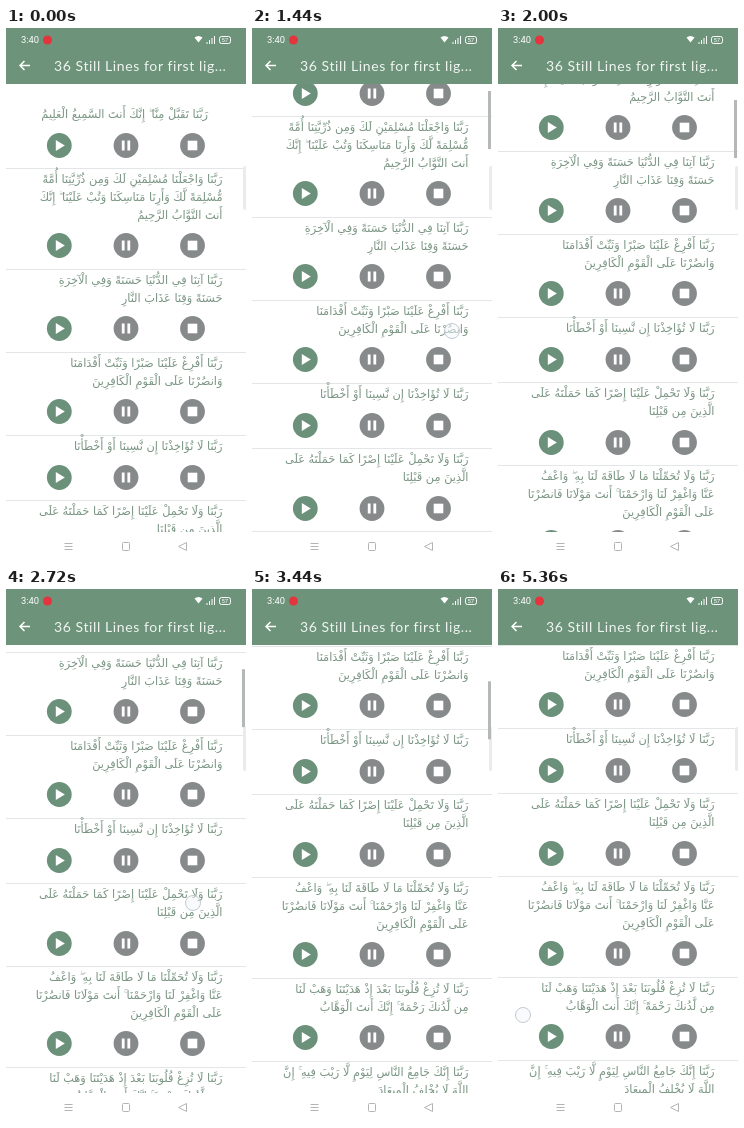
These frames come from a looping animation (240 px wide and 533 px high, 5440 ms). An HTML page:

```html
<!DOCTYPE html>
<html lang="en">
<head>
<meta charset="utf-8">
<style>
  html, body { margin: 0; width: 100%; height: 100%; overflow: hidden; background: #fff; }
  #stage { position: relative; width: 240px; height: 533px; overflow: hidden; background: #fff; }
  #stage > * { position: absolute; }
  #list { left: 0; top: 55px; width: 240px; height: 449px; overflow: hidden; }
  #rows { padding-top: 21px; }
  .row { box-sizing: border-box; border-bottom: 1px solid #e3e5e6; padding: 2px 23.5px 0 0; direction: rtl; }
  .line { height: 17.7px; font: 11.35px/17.7px "DejaVu Sans", sans-serif; color: #7a9583; white-space: nowrap; }
  .row svg { display: block; position: relative; left: 23.5px; margin-top: 8px; }
  #bar { left: 0; top: 0; width: 240px; height: 56px; background: #6d947a; color: #fff; }
  #bar svg { position: absolute; left: 0; top: 0; }
  #bar span { position: absolute; white-space: pre; }
  #clock { left: 15px; top: 6px; font: 9.4px/12px Roboto, sans-serif; }
  #title { left: 48px; top: 28px; font: 14px/20px Lato, sans-serif; letter-spacing: .6px; color: #f0f5f1; }
  #nav { left: 0; top: 504px; background: #fff; }
  #edge { left: 237px; top: 138px; width: 3px; height: 44px; background: #ebebeb; border-radius: 2px 0 0 2px; }
  #thumb { left: 236px; top: 56px; width: 3px; height: 58px; background: #b4b8b6; }
  #touch { left: -8px; top: -8px; width: 14px; height: 14px; border: 1px solid #c3cad4; border-radius: 50%; background: #f4f6f980; }
</style>
</head>
<body>
<div id="stage">
  <div id="list"><div id="rows"></div></div>
  <div id="edge"></div>
  <div id="thumb"></div>
  <div id="bar">
    <span id="clock">3:40</span>
    <svg width="240" height="56" fill="none" stroke="#fff">
      <circle cx="41.500" cy="12" r="4.500" fill="#e4343e" stroke="none"/>
      <path d="M188.500 9.500q4-3 8 0l-4 5z" fill="#fff" stroke="none"/>
      <path d="M201 16v-2M203.500 16v-4M206 16v-6M208.500 16v-8"/>
      <rect x="213.500" y="8.500" width="11" height="7" rx="2"/>
      <text x="215.500" y="14.200" font-family="Roboto, sans-serif" font-size="6" fill="#fff" stroke="none">57</text>
      <path d="M24 37.500H14.500M18.500 33l-4.500 4.500 4.500 4.500" stroke-width="1.500"/>
    </svg>
    <span id="title">36 Still Lines for first lig...</span>
  </div>
  <svg id="nav" width="240" height="29" fill="none" stroke="#b4b4b4">
    <path d="M58.500 11.500h8M58.500 14.500h8M58.500 17.500h8M180.500 10.500v8l-8-4z"/>
    <rect x="116.500" y="10.500" width="7" height="8" rx="1"/>
  </svg>
  <div id="touch"></div>
</div>
<script>
const LOOP = 5440, STEP = 80;
const $ = id => document.getElementById(id);

const verses = [
  ["&nbsp;&nbsp;&nbsp;&nbsp;رَبَّنَا تَقَبَّلْ مِنَّا ۖ إِنَّكَ أَنتَ السَّمِيعُ الْعَلِيمُ"],
  ["رَبَّنَا وَاجْعَلْنَا مُسْلِمَيْنِ لَكَ وَمِن ذُرِّيَّتِنَا أُمَّةً",
   "مُّسْلِمَةً لَّكَ وَأَرِنَا مَنَاسِكَنَا وَتُبْ عَلَيْنَا ۖ إِنَّكَ",
   "أَنتَ التَّوَّابُ الرَّحِيمُ"],
  ["رَبَّنَا آتِنَا فِي الدُّنْيَا حَسَنَةً وَفِي الْآخِرَةِ",
   "حَسَنَةً وَقِنَا عَذَابَ النَّارِ"],
  ["رَبَّنَا أَفْرِغْ عَلَيْنَا صَبْرًا وَثَبِّتْ أَقْدَامَنَا",
   "وَانصُرْنَا عَلَى الْقَوْمِ الْكَافِرِينَ"],
  ["رَبَّنَا لَا تُؤَاخِذْنَا إِن نَّسِينَا أَوْ أَخْطَأْنَا"],
  ["رَبَّنَا وَلَا تَحْمِلْ عَلَيْنَا إِصْرًا كَمَا حَمَلْتَهُ عَلَى",
   "الَّذِينَ مِن قَبْلِنَا"],
  ["رَبَّنَا وَلَا تُحَمِّلْنَا مَا لَا طَاقَةَ لَنَا بِهِ ۖ وَاعْفُ",
   "عَنَّا وَاغْفِرْ لَنَا وَارْحَمْنَا ۚ أَنتَ مَوْلَانَا فَانصُرْنَا",
   "عَلَى الْقَوْمِ الْكَافِرِينَ"],
  ["رَبَّنَا لَا تُزِغْ قُلُوبَنَا بَعْدَ إِذْ هَدَيْتَنَا وَهَبْ لَنَا",
   "مِن لَّدُنكَ رَحْمَةً ۚ إِنَّكَ أَنتَ الْوَهَّابُ"],
  ["رَبَّنَا إِنَّكَ جَامِعُ النَّاسِ لِيَوْمٍ لَّا رَيْبَ فِيهِ ۚ إِنَّ",
   "اللَّهَ لَا يُخْلِفُ الْمِيعَادَ"]
];

const buttons = `<svg width="240" height="27" fill="#fff">
  <circle cx="53.300" cy="13.500" r="12.400" fill="#6b917a"/><path d="M49.800 8v11l9-5.500z"/>
  <circle cx="120" cy="13.500" r="12.400" fill="#878a8b"/><path d="M115.800 8.500h2.800v10h-2.800zM121.400 8.500h2.800v10h-2.800z"/>
  <circle cx="186.500" cy="13.500" r="12.400" fill="#878a8b"/><path d="M181.700 8.700h9.600v9.600h-9.600z"/>
</svg>`;

$("rows").innerHTML = verses.map(lines =>
  `<div class="row" style="height:${47.4 + 17.8 * lines.length}px">` +
  lines.map(s => `<div class="line">${s}</div>`).join("") + buttons + "</div>").join("");

// [time, value] pairs, joined by straight lines
function track(keys, t) {
  const i = keys.findIndex(k => k[0] > t);
  if (i < 0) return keys[keys.length - 1][1];
  if (i === 0) return keys[0][1];
  const [t0, a] = keys[i - 1], [t1, b] = keys[i];
  return a + (b - a) * (t - t0) / (t1 - t0);
}

const scroll = [[1040, 0], [1200, 13], [1440, 52], [1600, 79], [1760, 101], [1920, 114], [2000, 118],
  [2080, 119], [2320, 119], [2480, 132], [2720, 178], [3040, 218], [3200, 245], [3360, 263], [3440, 267], [3520, 268]];
const thumbFade = [[1040, 0], [1120, 1], [3840, 1], [4080, 0]];
const tapFade = [[4560, 0], [4640, 1], [4720, 1], [4880, 0], [5200, 0], [5360, 1]];

function touchAt(t, y) {
  if (t >= 1120 && t < 1600) return [200, 355 - y, 1];
  if (t >= 2400 && t < 3120) return [track([[2400, 177], [2720, 187], [3040, 200]], t),
    track([[2400, 368], [2720, 314], [3040, 268]], t), 1];
  return [25, 426, track(tapFade, t)];
}

function draw(now) {
  const t = Math.floor(now % LOOP / STEP) * STEP;
  const y = track(scroll, t);
  $("rows").style.transform = `translateY(${-y}px)`;
  $("thumb").style.transform = `translateY(${y * 0.136}px)`;
  $("thumb").style.opacity = track(thumbFade, t);
  const [tx, ty, alpha] = touchAt(t, y);
  $("touch").style.transform = `translate(${tx}px, ${ty}px)`;
  $("touch").style.opacity = alpha;
}

const start = performance.now();
function tick() {
  draw(performance.now() - start);
  requestAnimationFrame(tick);
}
tick();
</script>
</body>
</html>
```
